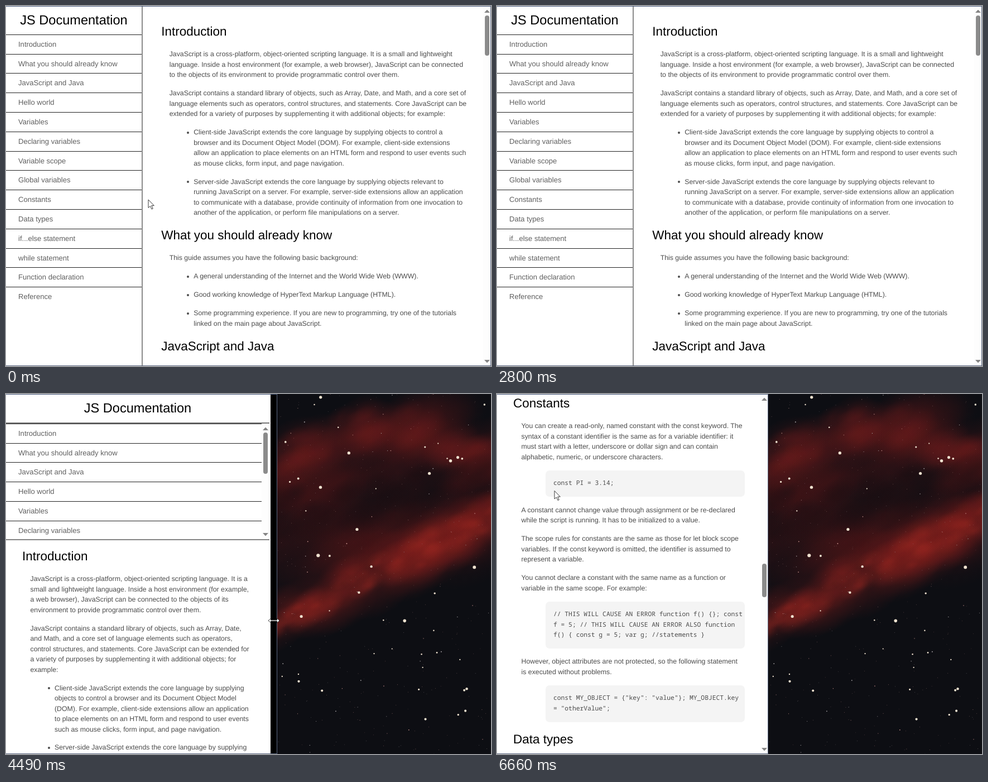
Recreate the animation shown at these times as an HTML page with a canvas. Size 869x645 px, loop 7.55 s.

```html
<!DOCTYPE html>
<html lang="en">
<head>
<meta charset="utf-8">
<title>JS Documentation</title>
<style>
html, body { margin: 0; width: 869px; height: 645px; overflow: hidden; }
body { position: relative; background: #0d0e13; color: #4c4c4c;
  font: 12.325px/18.49px "Liberation Sans", Arial, sans-serif; text-rendering: geometricPrecision; }
canvas, #win, #page, #doc, #side, .bar, #frame, #status, #cursor { position: absolute; left: 0; top: 0; }
#win { height: 645px; background: #000; overflow: hidden; }
#page { height: 645px; background: #fff; overflow: hidden; }
#doc { height: 645px; overflow: hidden; }
#frame { inset: 0; box-shadow: inset -1px 0 #5b6780, inset 0 1px #48597c, inset 0 -1px #5b6780; }
#side { width: 243px; height: 645px; border-right: 2px solid #8a8a8a; overflow: hidden; background: #fff; }
h1 { margin: 0; font-size: 23.55px; line-height: 50.75px; font-weight: 400; text-align: center; color: #000; }
#nav { overflow: hidden; position: relative; }
#nav div { box-sizing: border-box; height: 34.8px; padding-left: 22px; border-top: 1px solid #222;
  font-size: 13.05px; line-height: 33.8px; color: #606060; }
#nav .on { color: #000; font-weight: 700; }
main { padding: 29px 42.5px 0 278.2px; }
h2 { margin: 0 0 14.5px; font-size: 22.475px; line-height: 33.7px; font-weight: 400; color: #000; white-space: nowrap; }
p, li, pre { margin: 0 0 14.5px; }
p { margin-left: 14.5px; }
ul { list-style: none; margin: 0 0 0 58px; padding: 0; }
li { position: relative; }
li::before { content: ""; position: absolute; left: -12.5px; top: 7.6px; width: 4px; height: 4px; border-radius: 50%; background: #4c4c4c; }
pre { margin-left: 58px; padding: 14.5px 0 14.5px 14px; border-radius: 7px; background: #f4f4f4;
  font: 11.3px/18.49px "Noto Sans Mono", monospace; white-space: normal; }
.bar { width: 14px; background: #fdfdfd; }
.bar::before, .bar::after { content: ""; position: absolute; left: 2px; top: 6.5px; width: 10px; height: 5.5px;
  background: #858585; clip-path: polygon(50% 0, 100% 100%, 0 100%); }
.bar::after { top: auto; bottom: 6px; transform: scaleY(-1); }
.bar i { position: absolute; left: 3px; width: 8px; border-radius: 4px; background: #8b8b8b; }
#vbar { left: auto; right: 0; height: 645px; }
#hbar { top: 645px; transform: rotate(-90deg); transform-origin: 0 0; }
#hbar i { top: 17px; height: 451px; }
#navbar { left: auto; top: 53px; height: 207px; }
#navbar i { height: 74px; }
#status { top: 625px; height: 20px; box-sizing: border-box; padding-left: 4px; border-radius: 0 4px 0 0; background: #0b1a34;
  color: #fff; font: 10.2px/20px "Noto Sans", sans-serif; white-space: nowrap; overflow: hidden; }
#cursor { overflow: visible; width: 1px; height: 1px; }
.mobile h1 { border-bottom: 2px solid #777; }
.mobile #side { width: auto; right: 14px; height: 260px; border: 0; border-bottom: 2px solid #858585; }
.mobile #nav { margin-right: 14px; height: 207.5px; }
.mobile main { padding: 274px 42.5px 0 29px; }
.mobile #navbar { right: 0; }
#doc:not(.mobile) #navbar { display: none; }
#doc.jumped main { padding-top: 0; }
</style>
</head>
<body>
<canvas id="sky" width="869" height="645"></canvas>
<div id="win">
  <div id="page">
    <div id="doc">
      <main>
        <section>
          <h2>Introduction</h2>
          <p>JavaScript is a cross-platform, object-oriented scripting language. It is a small and lightweight language. Inside a host environment (for example, a web browser), JavaScript can be connected to the objects of its environment to provide programmatic control over them.</p>
          <p>JavaScript contains a standard library of objects, such as Array, Date, and Math, and a core set of language elements such as operators, control structures, and statements. Core JavaScript can be extended for a variety of purposes by supplementing it with additional objects; for example:</p>
          <ul>
            <li>Client-side JavaScript extends the core language by supplying objects to control a browser and its Document Object Model (DOM). For example, client-side extensions allow&nbsp;an application to place elements on an HTML form and respond to user events such as mouse clicks, form input, and page navigation.</li>
            <li>Server-side JavaScript extends the core language by supplying objects relevant to running JavaScript on a server. For example, server-side extensions allow an application to communicate with a database, provide continuity of information from one invocation to another of the application, or perform file manipulations on a server.</li>
          </ul>
        </section>
        <section>
          <h2>What you should already know</h2>
          <p>This guide assumes you have the following basic background:</p>
          <ul>
            <li>A general understanding of the Internet and the World Wide Web (WWW).</li>
            <li>Good working knowledge of HyperText Markup Language (HTML).</li>
            <li>Some programming experience. If you are new to programming, try one of the tutorials linked on the main page about JavaScript.</li>
          </ul>
        </section>
        <section><h2>JavaScript and Java</h2></section>
        <section>
          <h2>Declaring variables</h2>
          <p>You can declare a variable in three ways:</p>
          <p>With the keyword var. For example,</p>
          <pre>var x = 42.</pre>
          <p>This syntax can be used to declare both local and global variables.</p>
          <p>By simply assigning it a value. For example,</p>
          <pre>x = 42.</pre>
          <p>This always declares a global variable. It generates a strict JavaScript warning. You shouldn't use this variant.</p>
          <p>With the keyword let. For example,</p>
          <pre>let y = 13.</pre>
          <p>This syntax can be used to declare a block scope local variable. See Variable scope below.</p>
        </section>
        <section>
          <h2>Variable scope</h2>
          <p>When you declare a variable outside of any function, it is called a global variable, because it is available to any other code in the current document. When you declare a variable within a function, it is called a local variable, because it is available only within that function.</p>
          <p>JavaScript before ECMAScript 2015 does not have block statement scope; rather, a variable declared within a block is local to the function (or global scope) that the block resides within. For example the following code will log 5, because the scope of x is the function (or global context) within which x is declared.</p>
        </section>
        <section>
          <h2>Constants</h2>
          <p>You can create a read-only, named constant with the const keyword. The syntax of a constant identifier is the same as for a variable identifier: it must start with a letter, underscore or dollar sign and can contain alphabetic, numeric, or underscore characters.</p>
          <pre>const PI = 3.14;</pre>
          <p>A constant cannot change value through assignment or be re-declared while the script is running. It has to be initialized to a value.</p>
          <p>The scope rules for constants are the same as those for let block scope variables. If the const keyword is omitted, the identifier is assumed to represent a variable.</p>
          <p>You cannot declare a constant with the same name as a function or variable in the same scope. For example:</p>
          <pre>// THIS WILL CAUSE AN ERROR function f() {}; const f = 5; // THIS WILL CAUSE AN ERROR ALSO function f() { const g = 5; var g; //statements }</pre>
          <p>However, object attributes are not protected, so the following statement is&nbsp;executed without problems.</p>
          <pre>const MY_OBJECT = {"key": "value"}; MY_OBJECT.key = "otherValue";</pre>
        </section>
        <section><h2>Data types</h2></section>
      </main>
      <div id="side">
        <h1>JS Documentation</h1>
        <div id="nav"></div>
        <div id="navbar" class="bar"><i></i></div>
      </div>
      <div id="vbar" class="bar"><i></i></div>
      <div id="hbar" class="bar"><i></i></div>
    </div>
  </div>
  <div id="frame"></div>
  <div id="status"></div>
</div>
<svg id="cursor"><path fill="#fff" stroke="#222" stroke-width=".9" stroke-linejoin="round"/></svg>
<script>
const LOOP = 7550, ROW = 34.8;
const $ = s => document.querySelector(s);
const [win, page, doc, side, nav, hbar, status, cursor] =
  ['#win', '#page', '#doc', '#side', '#nav', '#hbar', '#status', '#cursor'].map($);
const shape = $('#cursor path'), thumb = $('#vbar i'), navThumb = $('#navbar i');
const sections = [...document.querySelectorAll('section')];

const items = ['Introduction', 'What you should already know', 'JavaScript and Java', 'Hello world', 'Variables',
  'Declaring variables', 'Variable scope', 'Global variables', 'Constants', 'Data types', 'if...else statement',
  'while statement', 'Function declaration', 'Reference'].map(name => {
  const row = document.createElement('div');
  row.textContent = name;
  nav.append(row);
  return row;
});

const shapes = {
  none: '',
  arrow: 'M0 0V14.5L3.5 11.5L6 17L8.2 16L5.8 10.6H10.3Z',
  hand: 'M-1.6 1.5Q0 -1 1.6 1.5V8Q7 6 7.5 9.3Q10 9 10 11V15Q10 18 8 20.5H0L-5.5 13Q-6 10.6 -4 11L-1.6 13ZM1.6 8V11M4.6 8V11M7.5 9.5V11.5',
  resize: 'M-10 0L-5.5 -4V-1H5.5V-4L10 0L5.5 4V1H-5.5V4Z'
};

// Progress from 0 to 1 between two times.
const span = (t, from, to) => Math.min(1, Math.max(0, (t - from) / (to - from)));
const smooth = p => p * p * (3 - 2 * p);

// Pointer moves: start, end, then where it lands.
const moves = [[40, 700, 160, 274], [960, 1120, 138, 246], [1800, 2060, 90, 70], [2160, 2420, 300, 130],
  [2720, 2800, 615, 509], [2800, 2801, 480, 406], [4840, 5100, 329, 192.8], [5600, 6010, 103, 173.5]];

function pointerAt(t, width, drag) {
  if (t >= 2800 && t < 4840) return [t < 4050 ? 872 : width - 6, 374 + 32 * drag];
  return moves.reduce(([x, y], [from, to, toX, toY]) => {
    const p = smooth(span(t, from, to));
    return [x + (toX - x) * p, y + (toY - y) * p];
  }, [255, 347]);
}

function cursorKind(t, x, y) {
  if (t < 2800) return x < 243 ? 'hand' : 'arrow';
  if (t < 3240) return 'none';
  if (t < 4840) return 'resize';
  return t < 6320 && x < 458 && y < 260 ? 'hand' : 'arrow';
}

function render(now) {
  let t = now % LOOP;
  if (t >= 4050 && t < 4570) t -= (t - 4050) % 40; // the drag repaints every 40 ms
  const drag = 1 - (1 - span(t, 4050, 4530)) ** 3.53;
  const width = 869 - 383 * drag;
  const [x, y] = pointerAt(t, width, drag);
  const scroll = 165 * span(t, 5098, 5560);
  const dragging = drag > 0 && drag < 1, mobile = width < 542;
  const first = t >= 6320 ? 5 : t >= 1580 && t < 2100 ? 3 : 0;

  win.style.width = width + 'px';
  page.style.width = width - (dragging ? 12 : 0) + 'px';
  const layout = mobile ? width : Math.max(width, 558.5);
  doc.style.width = layout + 'px';
  doc.className = (mobile ? 'mobile ' : '') + (first ? 'jumped' : '');
  sections.forEach((s, i) => s.hidden = i < first);
  side.hidden = mobile && first > 0;

  thumb.style.height = (mobile ? 60 : 71.5) + 'px';
  thumb.style.top = 17 + first * (mobile ? 57.4 : 51) + 'px';
  hbar.hidden = mobile || width > 600;
  hbar.style.height = layout + 'px';
  items[0].style.marginTop = -scroll + 'px';
  navThumb.style.top = 16 + scroll * .47 + 'px';

  const kind = cursorKind(t, x, y);
  shape.setAttribute('d', shapes[kind]);
  cursor.style.transform = `translate(${x}px, ${y}px)`;
  // Wheel scrolling leaves the hovered row as it was until it settles.
  const offset = (mobile ? 53 : 50.75) - (t < 5560 ? 0 : scroll);
  const hovered = kind === 'hand' ? Math.floor((y - offset) / ROW) : -1;
  items.forEach((row, i) => row.classList.toggle('on', i === hovered));

  const expand = t < 2500 ? span(t, 960, 1280) : 0;
  status.style.width = 160 + 128 * expand + 'px';
  status.style.opacity = span(t, 440, 520) - span(t, 2300, 2420) + span(t, 5000, 5080) - span(t, 6540, 6660);
  status.textContent = expand
    ? 'https://documentation-layout.vercel.app/#' + (t < 1950 ? 'declaring_vari...' : 'introduction')
    : '...vercel.app//';
  requestAnimationFrame(() => render(performance.now()));
}

function paintSky() {
  const c = $('#sky').getContext('2d');
  const left = 486, breadth = 383;
  let seed = 7;
  const random = () => (seed = seed * 16807 % 2147483647) / 2147483647;
  const crest = u => 100 - 70 * Math.sin(Math.PI * u);
  const ridge = u => 405 - 180 * u;

  // Soft slanted puffs scattered around a curve that crosses the sky.
  const puffs = (count, rgb, alpha, radius, curve, scatter) => {
    for (let i = 0; i < count; i++) {
      const u = random() * 1.1 - .05, r = radius * (.6 + random());
      c.save();
      c.translate(left + u * breadth, curve(u) + (random() - .5) * scatter);
      c.rotate(-.45);
      c.scale(1.7, 1);
      const glow = c.createRadialGradient(0, 0, 0, 0, 0, r);
      glow.addColorStop(0, `rgba(${rgb}, ${alpha})`);
      glow.addColorStop(1, `rgba(${rgb}, 0)`);
      c.fillStyle = glow;
      c.fillRect(-r, -r, 2 * r, 2 * r);
      c.restore();
    }
  };
  const star = (x, y, r, color) => {
    c.fillStyle = color;
    c.beginPath();
    c.arc(x, y, r, 0, 7);
    c.fill();
  };

  c.fillStyle = '#0d0e13';
  c.fillRect(0, 0, 869, 645);
  puffs(60, '90, 22, 24', .2, 45, u => (crest(u) + ridge(u)) / 2, 230);
  puffs(55, '120, 28, 28', .22, 28, u => crest(u) + 25, 60);
  puffs(35, '24, 13, 17', .35, 26, u => 215 - 50 * u, 80);
  puffs(60, '130, 30, 28', .25, 30, ridge, 70);
  puffs(60, '165, 42, 34', .2, 13, ridge, 50);
  for (let i = 0; i < 420; i++) {
    const r = .35 + random() ** 14 * 3;
    star(left + random() * breadth, random() * 645, r, r > 1 ? '#efe2d0' : ['#c9958e', '#a9a5a8', '#8d6666'][i % 3]);
  }
}

paintSky();
render(performance.now());
</script>
</body>
</html>
```
